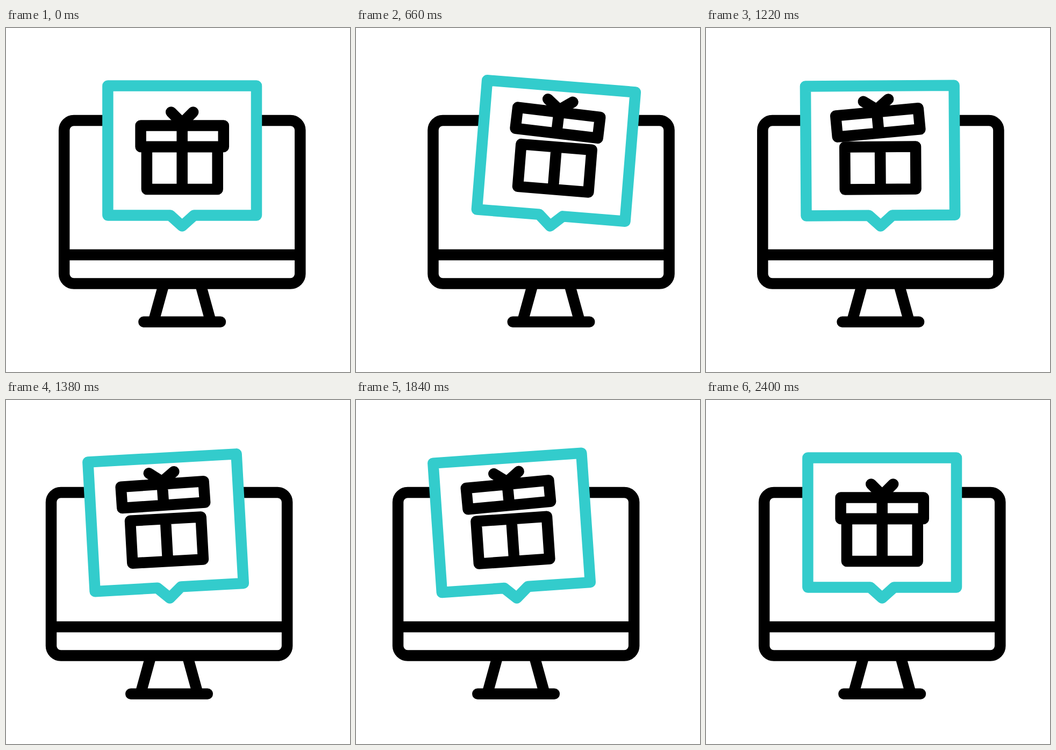
An HTML page that plays this animation: 640x640 px, repeating every 2420 ms.

```html
<!DOCTYPE html>
<html lang="en">
<head>
<meta charset="utf-8">
<title>Gift on screen</title>
<style>
  html, body { margin: 0; width: 100%; height: 100%; overflow: hidden; background: #fff; }
  svg { display: block; width: 100vw; height: 100vh; }
</style>
</head>
<body>
<svg viewBox="0 0 640 640" fill="none" stroke="#000" stroke-width="20.5" stroke-linejoin="round">
  <g id="scene">
    <rect x="108.2" y="172" width="439.1" height="303.6" rx="18"/>
    <path d="M108.2 422H547.3M293.9 475.6L274.3 546.8M361.5 475.6L381.1 546.8"/>
    <path d="M256.4 546.8H399" stroke-linecap="round"/>
    <g id="bubble">
      <path d="M189.4 107.6H466V348.6H349.7L327.7 368.5L305.7 348.6H189.4Z" fill="#fff" stroke="#33cccc"/>
      <path d="M261.9 221H393.7V300H261.9ZM327.7 221V300"/>
      <g id="lid">
        <path d="M250.6 181.6H404.8V221H250.6ZM327.7 181.6V221"/>
        <g stroke-linecap="round">
          <path id="left" d="M327.7 177L307.2 156.5"/>
          <path id="right" d="M327.7 177L348.2 156.5"/>
        </g>
      </g>
    </g>
  </g>
</svg>
<script>
const LOOP = 2420, END = 2400, FRAME = 20, CX = 327.7;
const part = Object.fromEntries(
  ['scene', 'bubble', 'lid', 'left', 'right'].map(id => [id, document.getElementById(id)]));

const ease = p => p * p * (3 - 2 * p);

// Eased value through evenly spaced keys over the whole motion
function track(keys, t) {
  const pos = t / END * (keys.length - 1);
  const i = Math.min(Math.floor(pos), keys.length - 2);
  return keys[i] + (keys[i + 1] - keys[i]) * ease(pos - i);
}

const move = (el, value) => el.setAttribute('transform', value);
const turn = (angle, y) => `rotate(${angle} ${CX} ${y})`;

function draw(t) {
  const sway = track([0, 1, -1, 0], t);
  const wobble = track([0, -5, 5, -5, 5, -5, 0], t);
  const lift = track([0, 1, 1, 1, 1, 1, 0], t);

  move(part.scene, `translate(${38.4 * sway} 0)`);
  move(part.bubble, turn(5 * sway, 345));
  move(part.lid, `translate(${-2 * lift} ${-25.5 * lift}) ${turn(wobble, 224)}`);
  move(part.left, turn(-8.5 * lift, 177));
  move(part.right, turn(8.5 * lift, 177));
}

const start = performance.now();

function tick() {
  const t = (performance.now() - start) % LOOP;
  draw(Math.min(Math.floor(t / FRAME) * FRAME, END));
  requestAnimationFrame(tick);
}

tick();
</script>
</body>
</html>
```
